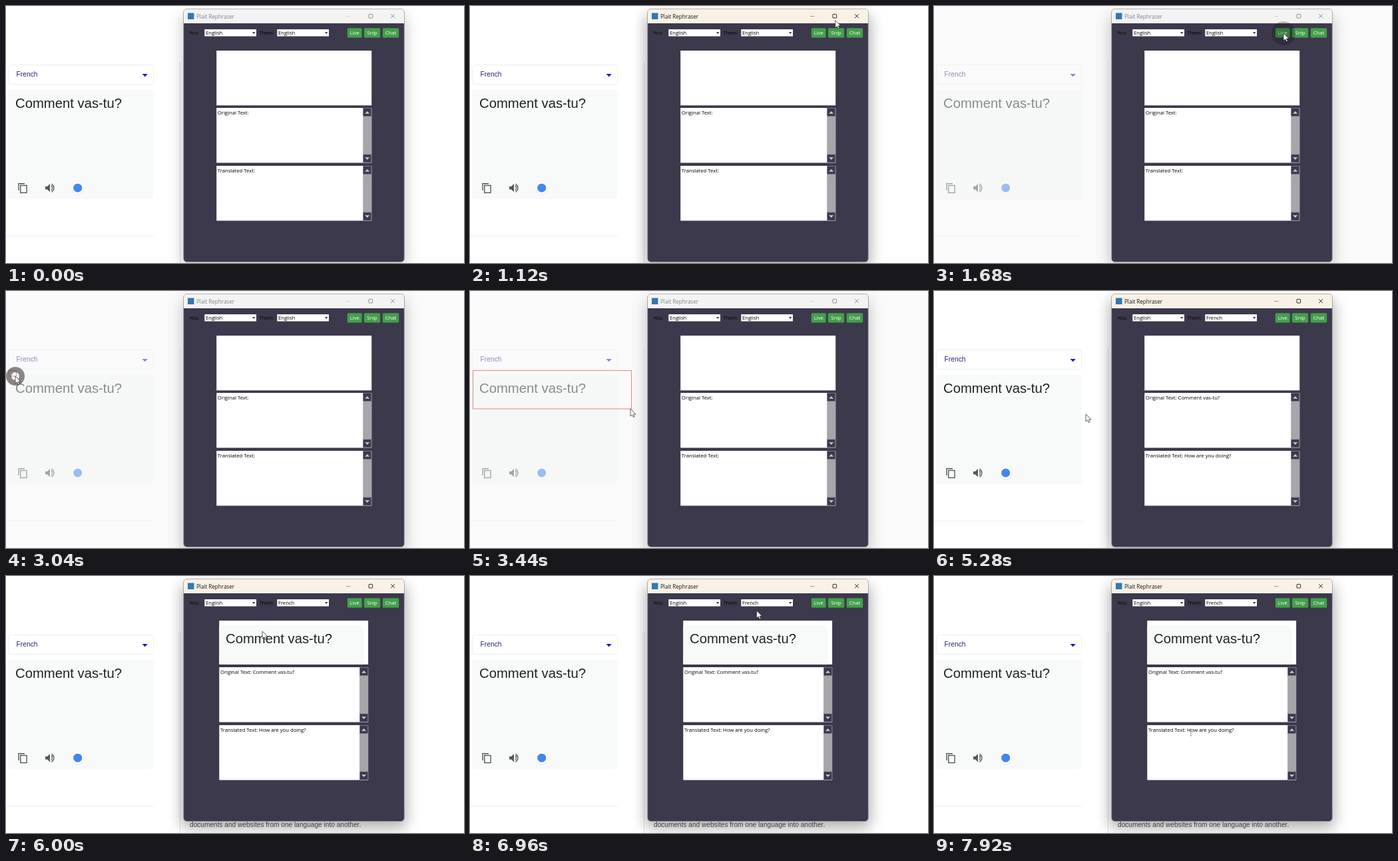
Recreate the animation shown at these times as an HTML page. Size 688 by 386 pixels, loop 8 s.

```html
<!DOCTYPE html>
<html lang="en">
<head>
<meta charset="utf-8">
<title>Screen translation demo</title>
<style>
  html, body { margin: 0; width: 100%; height: 100%; overflow: hidden; background: #fff; }
  svg { display: block; width: 100%; height: 100%; }
  text { white-space: pre; }
  .page { font-family: "Liberation Sans", Arial, sans-serif; }
  .app { font: 500 7.6px "Open Sans", "Noto Sans", sans-serif; }
</style>
</head>
<body>
<svg id="stage" viewBox="0 0 688 386" xmlns="http://www.w3.org/2000/svg"></svg>
<script>
const LOOP = 8000, STEP = 80;
const BODY = '#3d394c';

const rect = (x, y, w, h, fill, extra = '') =>
  `<rect x="${x}" y="${y}" width="${w}" height="${h}" fill="${fill}" ${extra}/>`;
const text = (x, y, str, fill = '#000', extra = '') =>
  `<text x="${x}" y="${y}" fill="${fill}" ${extra}>${str}</text>`;
const path = (d, fill, extra = '') => `<path d="${d}" fill="${fill}" ${extra}/>`;

const select = (x, id, value) =>
  rect(x + .3, 35, 77.7, 10.5, '#fff') + text(x + 2, 43.4, value, '#000', `id="${id}"`) +
  path(`M${x + 72} 39.2h4.4l-2.2 2.6z`, '#111');

const button = (x, w, label) =>
  rect(x - .2, 33.3, w + .4, 14.2, '#43a04a', 'rx="1.5"') +
  text(x + w / 2, 43.4, label, '#fff', 'text-anchor="middle"');

const scrollbar = (x, y) =>
  rect(x, y, 13, 82.5, 'url(#stipple)') +
  rect(x + .5, y + .5, 12, 12, BODY, 'stroke="#777585" stroke-width=".7"') +
  rect(x + .5, y + 70, 12, 12, BODY, 'stroke="#777585" stroke-width=".7"') +
  path(`M${x + 3} ${y + 8.7}h7l-3.5-3.8z`, '#c9c8cf') +
  path(`M${x + 3} ${y + 74.2}h7l-3.5 3.8z`, '#c9c8cf');

const textPanel = (x, y, w, label, answer) =>
  rect(x, y, w, 82.5, '#fff') + scrollbar(x + w - 13, y) +
  text(x + 1.6, y + 10, `${label} Text:<tspan class="answer"> ${answer}</tspan>`, '#000', 'font-size="7.7"');

const panels = (x, w, snipHeight, top1, top2) =>
  rect(x, 67, w, snipHeight, '#fff') +
  textPanel(x, top1, w, 'Original', 'Comment vas-tu?') +
  textPanel(x, top2, w, 'Translated', 'How are you doing?');

const phrase = (x, y) =>
  text(x, y, 'Comment vas-tu?', '#202124', 'class="page" font-size="20.3" font-weight="400"');

const pageArt = `
  <g class="page">
    ${rect(3.5, 88.5, 218, 29, '#fff', 'rx="4" stroke="#eceef0"')}
    ${text(15.5, 106.4, 'French', '#25257a', 'font-size="10.3"')}
    ${path('M204.5 102h8.4l-4.2 4.3z', '#1c1ca8')}
    ${rect(3, 125.5, 218.5, 165, '#f8faf9', 'rx="5"')}
    ${phrase(14, 152.7)}
    <g fill="none" stroke="#55585c" stroke-width="1.4">
      <path d="M19 277v-10.2h9"/><rect x="21.7" y="269.5" width="9.4" height="11"/>
      <path d="M68 269.5q3 3.7 0 7.4M68.5 267q7 6.3 0 12.6" stroke-width="1.3"/>
    </g>
    ${path('M59 271h3l4-4v12.6l-4-4h-3z', '#55585c')}
    <circle cx="107.7" cy="274" r="9.5" fill="#e6e8e9"/>
    <circle cx="107.7" cy="273.2" r="9.3" fill="#fff"/>
    <circle cx="107.7" cy="273.2" r="6.5" fill="#4285f4"/>
    ${rect(0, 345, 222, 1, '#f0f0f0')}
    ${rect(261, 84, 1, 302, '#e2e3e5')}
    ${text(276, 377, 'documents and websites from one language into another.', '#4d5156', 'font-size="10.15"')}
  </g>`;

const windowArt = `
  <g class="app">
    ${rect(264, 14, 337, 380, '#000', 'id="shadow" rx="6" filter="url(#blur)"')}
    ${rect(266.7, 4.5, 331.6, 380, BODY, 'id="body" rx="5" stroke="#a3a1a8" stroke-width=".8"')}
    <path id="bar" d="M267 26V9.5q0-4.7 4.7-4.7h321.6q4.7 0 4.7 4.7V26z"/>
    ${rect(273, 10.5, 9.5, 9.5, '#2f78b7')}
    <g id="caption">
      ${text(286, 18.6, 'Plait Rephraser', 'currentColor', 'font-size="8.07"')}
      <g fill="none" stroke="currentColor" stroke-width=".9">
        <path id="minimize" d="M511 15.5h6.5"/>
        <rect x="545" y="12.4" width="5.6" height="5.6" rx=".8"/>
        <path d="M578 12.2l6 6m0-6l-6 6"/>
      </g>
    </g>
    ${text(275, 43.4, 'You:')}${select(298, 'you', 'English')}
    ${text(380.5, 43.4, 'Them:')}${select(407, 'them', 'English')}
    ${button(513, 21.5, 'Live')}${button(538, 24, 'Snip')}${button(566, 24, 'Chat')}
    <g id="before">${panels(316.2, 233, 82.3, 153, 240)}</g>
    <g id="after">
      ${panels(320.3, 223.8, 65.8, 137, 224)}
      <g clip-path="url(#snipClip)">
        ${rect(319, 73.5, 218.5, 165, '#f8faf9', 'rx="5"')}${phrase(330, 100.5)}
      </g>
    </g>
  </g>`;

document.getElementById('stage').innerHTML = `
  <defs>
    <pattern id="stipple" width="3" height="3" patternUnits="userSpaceOnUse">
      ${rect(0, 0, 3, 3, '#c4c4c6')}${rect(0, 0, 1.5, 1.5, '#88878d')}${rect(1.5, 1.5, 1.5, 1.5, '#88878d')}
    </pattern>
    <filter id="blur" x="-20%" y="-20%" width="140%" height="140%"><feGaussianBlur stdDeviation="11"/></filter>
    <clipPath id="snipClip"><rect x="320.3" y="67" width="223.8" height="65.8"/></clipPath>
  </defs>
  ${rect(0, 0, 688, 386, '#fff')}
  ${pageArt}
  ${rect(0, 0, 688, 386, '#f5f5f5', 'id="veil"')}
  ${windowArt}
  ${rect(4.5, 119.5, 0, 0, 'none', 'id="marquee" stroke="#e58a7f"')}
  <circle id="ripple"/>
  <path id="arrow" d="M0 0V11.2L2.6 8.8 4.4 12.6 6.2 11.8 4.5 8.1H8.1Z" fill="#fff" stroke="#222" stroke-width=".7"/>
  <path id="beam" d="M-2-5.5q2 0 2 1.5V4q0 1.5-2 1.5M2-5.5q-2 0-2 1.5V4q0 1.5 2 1.5" fill="none" stroke="#999" stroke-width=".6"/>`;

const el = id => document.getElementById(id);
const answers = document.querySelectorAll('.answer');
const set = (id, attrs) => { for (const k in attrs) el(id).setAttribute(k, attrs[k]); };
const show = (id, on) => { el(id).style.display = on ? '' : 'none'; };

// Rows are [time, ...values]; values ease between rows.
const CURSOR = [
  [720, 600, -20], [1360, 525, 41], [1680, 525, 41], [2000, 310, 160], [2240, 90, 190],
  [2480, 10, 124], [2880, 4.5, 119.5], [2960, 4.5, 119.5], [3040, 14, 128], [3440, 241, 177],
  [3600, 241, 177], [4080, 230, 184], [4400, 228, 185], [5760, 228, 185], [6000, 385, 83],
  [6320, 428, 58], [6640, 416, 39.5], [6800, 434, 39.5], [6880, 434, 39.5], [7200, 412, 120],
  [7600, 386, 238], [7680, 386, 238], [7920, 386, 235]
];
const ACTIVE = [[0, 0], [400, 1], [1360, 1], [1600, 0], [4480, 0], [4800, 1]];
const VEIL = [[1280, 0], [1600, .5], [4480, .5], [4800, 0]];
const CLICKS = [[1360, 525, 41], [2960, 14, 128], [4160, 230, 184]];

function at(rows, t) {
  const i = rows.findIndex(r => r[0] > t);
  if (i === 0) return rows[0].slice(1);
  if (i < 0) return rows[rows.length - 1].slice(1);
  const a = rows[i - 1], b = rows[i];
  const p = (t - a[0]) / (b[0] - a[0]), e = p * p * (3 - 2 * p);
  return a.slice(1).map((v, k) => v + (b[k + 1] - v) * e);
}

const mix = (a, b, p) => `rgb(${a.map((v, i) => Math.round(v + (b[i] - v) * p))})`;

function drawRipple(t) {
  const click = CLICKS.find(c => t >= c[0] && t <= c[0] + 320);
  show('ripple', click);
  if (!click) return;
  const age = (t - click[0]) / 320;
  const fading = age > .6;
  set('ripple', {
    cx: click[1], cy: click[2], r: fading ? 18 : 10,
    fill: fading ? `rgba(0,0,0,${.62 - .4 * age})` : 'none',
    stroke: fading ? 'none' : 'rgba(75,75,75,.65)', 'stroke-width': 8
  });
}

function draw(t) {
  const [active] = at(ACTIVE, t);
  const [x, y] = at(CURSOR, t);
  const translated = t >= 5280, resized = t >= 5520;

  set('veil', { opacity: at(VEIL, t)[0] });
  set('bar', { fill: mix([243, 243, 243], [249, 241, 230], active) });
  el('caption').style.color = mix([132, 132, 132], [20, 20, 20], active);
  set('minimize', { opacity: .3 + .15 * active });
  set('shadow', { opacity: .2 + .12 * active, height: resized ? 364 : 380 });
  set('body', { height: resized ? 364 : 380 });

  el('them').textContent = translated ? 'French' : 'English';
  answers.forEach(a => { a.style.display = translated ? '' : 'none'; });
  show('before', !resized);
  show('after', resized);

  const dragging = t >= 3040 && t < 4560;
  show('marquee', dragging);
  if (dragging) {
    const [mx, my] = t > 4080 ? [230, 184] : [x, y];
    set('marquee', { width: mx - 3, height: my - 119.5 });
  }
  drawRipple(t);

  const overText = resized && x > 320 && x < 531 && y > 137 && y < 306;
  show('arrow', t >= 800 && !overText);
  show('beam', overText);
  set(overText ? 'beam' : 'arrow', { transform: `translate(${x} ${y})` });
}

const start = performance.now();
function tick() {
  const t = (performance.now() - start) % LOOP;
  draw(Math.floor(t / STEP) * STEP);
  requestAnimationFrame(tick);
}
tick();
</script>
</body>
</html>
```
